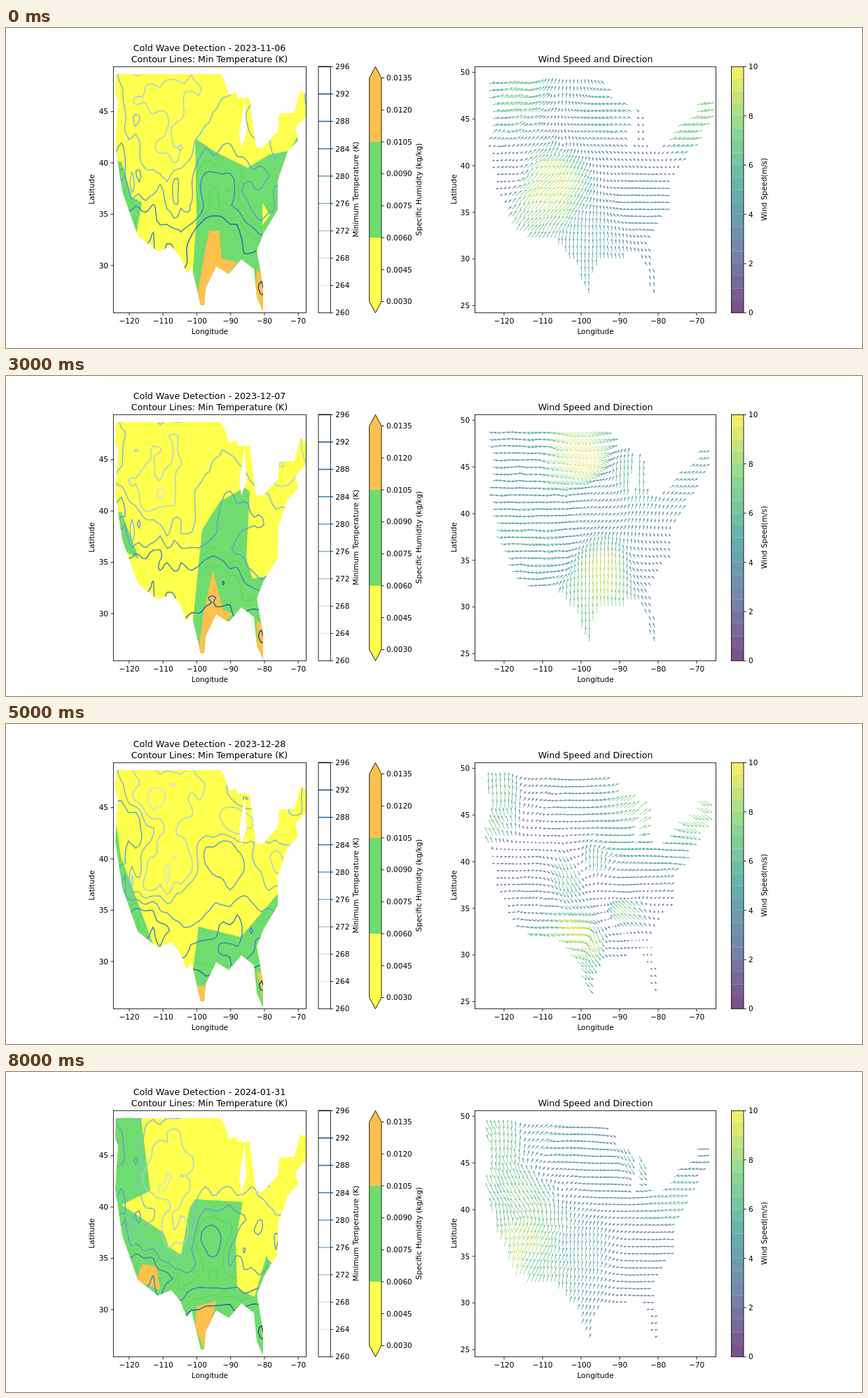
Animation of 1222x458 px, one loop 9000 ms. Source, as an HTML page with a canvas:

```html
<!DOCTYPE html>
<html lang="en">
<head>
<meta charset="utf-8">
<title>Cold wave detection</title>
<style>
  html, body { margin: 0; width: 100%; height: 100%; overflow: hidden; background: #fff; }
  canvas { display: block; }
</style>
</head>
<body>
<canvas id="stage" width="1222" height="458"></canvas>
<script>
const ctx = document.getElementById('stage').getContext('2d');
const FRAME_MS = 1000, YELLOW = '#ffff4d', GREEN = '#6fdc6f', ORANGE = '#ffc04d';
const TOP = 55.3, BOTTOM = 407.7, HEIGHT = BOTTOM - TOP;

// Land outline in the pixels of the left map: north and east coast, south and west coast, lake.
const land = new Path2D(
  'M157 66H306L313 78 318 96 328 92 331 100 348 100 354 150 357 170 366 172 388 148 390 123 412 121 420 89 428 94V127L413 143 417 161 402 177 388 218 388 260 368 293 358 318 367 370V406L358 385 354 345 336 331'
  + 'L318 352 300 341 285 372 283 397 278 397 265 342 258 351 249 328 236 312 217 320 188 297 166 234 156 168 160 105 156 93Z'
  + 'M341 102L333 150 336 172 343 150Z');

// temps: x, y, kelvin.  wind: x, y, eastward, northward (m/s).
const scenes = [];
const addScene = (date, green, orange, temps, wind) => scenes.push({ date, green, orange, temps, wind });
const coastTemps = [164, 200, 281, 195, 290, 285, 281, 385, 290, 363, 380, 291];
const southTips = 'M272 375H285V400H270ZM358 355H370V410Z';

addScene('2023-11-06',
  'M270 158L300 178 345 200 376 181 405 176 420 148 440 420H262L272 270ZM150 188L165 192 180 242 194 250 185 300H150ZM366 250L377 268 366 282Z',
  'M290 290L304 290 308 330 330 335 284 400H270L284 320ZM358 345L370 360V410L356 390Z',
  [230, 90, 272, 220, 180, 272, 390, 140, 275, 300, 240, 286, 250, 250, 279, 295, 295, 291, 360, 240, 279],
  [730, 95, 6, 2, 805, 75, 0, 4, 850, 120, -5, 1.5, 700, 210, 2, 1, 770, 235, 6, 7, 840, 320, -.5, 5, 915, 250, -4, .5, 985, 135, 7, 2]);

addScene('2023-11-17',
  'M150 110L162 112 164 195 192 250 240 268 303 268 325 296 350 255 392 212 430 420H150Z',
  'M272 375H285V400H270ZM350 338L370 350V410L355 390Z',
  [220, 90, 270, 220, 190, 268, 300, 150, 269, 390, 150, 271, 330, 230, 274, 260, 250, 275, 310, 315, 283],
  [700, 190, 1, 7, 760, 285, 4, 3, 800, 110, 4, -.5, 805, 250, 1, 6, 850, 200, 3, -1, 895, 110, 8, 0, 900, 280, -.5, 4, 980, 140, 4, -2]);

addScene('2023-11-27', 'M150 180L164 190 200 275 245 310 310 286 375 280 440 420H150Z', southTips);

addScene('2023-12-07',
  'M340 160L348 165 343 260 352 290 372 287 430 420H260L280 220 305 180ZM150 195L165 195 190 262 150 240Z',
  'M295 278L310 335 325 340 290 370 284 400H274L282 340ZM358 350L370 360V410L358 390Z',
  [240, 90, 274, 210, 170, 269, 270, 190, 276, 320, 200, 281, 400, 130, 272, 300, 300, 287, 365, 250, 278],
  [710, 130, 4, -.3, 760, 240, 5.5, -1, 818, 120, 8, -5, 850, 175, 3, 2, 855, 290, -.3, 9, 890, 150, 0, 6, 925, 280, -2.5, 2, 970, 140, 4, 2]);

addScene('2023-12-18',
  'M150 60H182L190 75 186 175 190 240 225 310 215 325 150 280ZM268 222L278 225 292 320 320 345 284 400H270L252 312ZM355 330H366L370 410H350Z',
  'M155 185L164 188 194 285 188 300 160 225ZM364 380H370V410Z',
  [170, 150, 283, 240, 110, 271, 240, 210, 269, 270, 240, 279, 330, 130, 268, 390, 190, 272, 320, 315, 281],
  [695, 150, -3, 6, 750, 240, 3, 1, 790, 100, 3.5, .5, 838, 200, .3, 6.5, 903, 115, 6, 5, 880, 240, 4, -.4, 955, 200, 6.5, -2, 860, 315, 3, -.5]);

addScene('2023-12-28', 'M150 90L164 190 212 320H150ZM275 290L335 305 395 235 440 420H258Z', southTips);

addScene('2024-01-07',
  'M150 100H160L162 205 182 250 150 200ZM278 245L284 276 310 271 332 300 366 298 380 285 370 420H265L275 310Z',
  'M286 345L300 342 285 365ZM358 372L370 370V410Z',
  [220, 110, 268, 225, 210, 268, 280, 130, 273, 340, 110, 280, 310, 190, 283, 395, 160, 278, 320, 310, 286],
  [695, 110, 0, 7, 720, 200, 2, 0, 790, 100, 3, .2, 865, 170, 6, .6, 803, 215, 2, -7, 810, 300, 9.5, -1.5, 838, 310, 2, -9, 885, 270, -6.5, 5.5, 950, 210, 2.5, 3, 985, 135, 6, -4]);

addScene('2024-01-19', 'M150 60H170L184 150 240 318H150ZM268 300L285 285 350 315 440 420H260Z', southTips);

addScene('2024-01-31',
  'M150 60H192L206 170 165 190 225 230 232 250 250 262 262 195 270 182 338 186 328 240 330 310 355 322 372 262 430 420H150Z',
  'M195 275L215 278 220 312 185 298ZM272 335L300 328 284 400 270 365ZM365 370H370V410Z',
  [170, 130, 279, 220, 150, 269, 240, 230, 270, 320, 110, 273, 290, 240, 285, 345, 250, 279, 395, 150, 275],
  [690, 110, -1.5, 7, 740, 185, -4, 6, 740, 245, 3, 8, 790, 110, 4.5, 1, 825, 265, .7, 5.5, 850, 140, 4, -.5, 905, 120, 2, -5, 900, 280, 3, -.3, 950, 170, 4.5, 2.2]);

// A day without its own samples takes those of both neighbours.
const samplesOf = (index, key) => scenes[index][key]
  || [...scenes[index - 1][key], ...scenes[index + 1][key]];

const ramp = hexes => {
  const stops = hexes.map(h => [1, 3, 5].map(k => parseInt(h.slice(k, k + 2), 16)));
  return f => {
    const p = Math.min(Math.max(f, 0), 0.9999) * (stops.length - 1), i = Math.floor(p);
    return `rgb(${stops[i].map((c, k) => Math.round(c + (stops[i + 1][k] - c) * (p - i)))})`;
  };
};
const viridis = ramp(['#440154', '#3b528b', '#21918c', '#5ec962', '#fde725']);
const blues = ramp(['#f7fbff', '#c7dcef', '#6baed6', '#2171b5', '#08306b']);
const levelColor = k => blues((k - 260) / 36);

const hash = (i, j) => { const s = Math.sin(i * 127.1 + j * 311.7) * 43758.5; return 2 * (s - Math.floor(s)) - 1; };
const mix = (a, b, f) => a + (b - a) * f;
function noise(x, y) {
  const i = Math.floor(x), j = Math.floor(y), u = x - i;
  return mix(mix(hash(i, j), hash(i + 1, j), u), mix(hash(i, j + 1), hash(i + 1, j + 1), u), y - j);
}

// Inverse-distance mean of the values that follow each x, y pair.
function interpolate(samples, size, x, y) {
  const sums = new Array(size).fill(0);
  let total = 0;
  for (let i = 0; i < samples.length; i += size + 2) {
    const w = ((samples[i] - x) ** 2 + (samples[i + 1] - y) ** 2 + 90) ** -1.6;
    total += w;
    for (let k = 0; k < size; k++) sums[k] += w * samples[i + 2 + k];
  }
  return sums.map(s => s / total);
}

function temperatureGrid(index) {
  const samples = [...coastTemps, ...samplesOf(index, 'temps')], rows = [];
  for (let y = 58; y <= 412; y += 7) {
    const row = [];
    for (let x = 150; x <= 432; x += 5) {
      const rough = x < 255 ? 3.4 : 1.5;
      const ridge = 9 * Math.exp(-(((x - 180) / 5) ** 2) - ((y - 222) / 22) ** 2);
      row.push([x, y, interpolate(samples, 1, x, y)[0] + rough * noise(x / 11, y / 21) - ridge]);
    }
    rows.push(row);
  }
  return rows;
}

function contour(grid, level, color, width) {
  ctx.beginPath();
  for (let j = 1; j < grid.length; j++) for (let i = 1; i < grid[j].length; i++) {
    const corners = [grid[j - 1][i - 1], grid[j - 1][i], grid[j][i], grid[j][i - 1]], hits = [];
    corners.forEach((a, k) => {
      const b = corners[(k + 1) % 4];
      if (a[2] < level === b[2] < level) return;
      const f = (level - a[2]) / (b[2] - a[2]);
      hits.push([mix(a[0], b[0], f), mix(a[1], b[1], f)]);
    });
    for (let h = 0; h < hits.length; h += 2) { ctx.moveTo(...hits[h]); ctx.lineTo(...hits[h + 1]); }
  }
  ctx.strokeStyle = color;
  ctx.lineWidth = width;
  ctx.stroke();
}

function drawMap(index) {
  const green = new Path2D(scenes[index].green), grid = temperatureGrid(index);
  ctx.save();
  ctx.lineCap = 'round';
  ctx.clip(land, 'evenodd');
  ctx.fillStyle = YELLOW;
  ctx.fillRect(150, TOP, 282, HEIGHT);
  ctx.fillStyle = GREEN;
  ctx.fill(green, 'evenodd');
  ctx.save();
  ctx.clip(green, 'evenodd');
  for (const level of [282, 286]) contour(grid, level, '#4fcf4f', 0.7);
  ctx.restore();
  ctx.fillStyle = ORANGE;
  ctx.fill(new Path2D(scenes[index].orange));
  for (let k = 260; k <= 296; k += 4) contour(grid, k, levelColor(k), 1.4);
  ctx.restore();
}

function arrow(x, y, u, v) {
  const speed = Math.hypot(u, v), length = speed * 2, head = Math.min(4.1, length);
  ctx.save();
  ctx.translate(x, y);
  ctx.rotate(Math.atan2(-v, u));
  ctx.fillStyle = viridis(speed / 10);
  ctx.fillRect(0, -0.4, length - head * 0.9, 0.8);
  ctx.beginPath();
  ctx.moveTo(length, 0);
  ctx.lineTo(length - head, -1.25);
  ctx.lineTo(length - head, 1.25);
  ctx.fill();
  ctx.restore();
}

function drawWind(index) {
  const samples = samplesOf(index, 'wind');
  ctx.globalAlpha = 0.75;
  for (let y = 80; y < 402; y += 10) for (let x = 684; x < 1006; x += 5.5) {
    const mapX = 175.9 + (x - 711) * 0.8775, mapY = 46.3 + (y - 63.4) * 1.1 + 2;
    if (!ctx.isPointInPath(land, mapX, mapY, 'evenodd')) continue;
    const [u, v] = interpolate(samples, 2, x, y), gust = x < 800 ? 1.3 : 0.5;
    arrow(x, y, u + gust * noise(x / 13, y / 17), v + gust * noise(x / 13 + 40, y / 17));
  }
  ctx.globalAlpha = 1;
}

function text(label, x, y, align = 'center', size = 10.5, turned = false) {
  ctx.save();
  ctx.translate(x, y);
  if (turned) ctx.rotate(-Math.PI / 2);
  ctx.font = `${size}px "DejaVu Sans", sans-serif`;
  ctx.textAlign = align;
  ctx.fillStyle = '#000';
  ctx.fillText(label, 0, size * 0.36);
  ctx.restore();
}
const title = (label, x, y) => text(label, x, y, 'center', 12.6);
const sideLabel = (label, x) => text(label, x, 231, 'center', 10.5, true);

function line(x1, y1, x2, y2, color = '#000', width = 0.85) {
  ctx.beginPath();
  ctx.moveTo(x1, y1);
  ctx.lineTo(x2, y2);
  ctx.strokeStyle = color;
  ctx.lineWidth = width;
  ctx.stroke();
}

function box(x, width) {
  ctx.strokeStyle = '#000';
  ctx.lineWidth = 0.85;
  ctx.strokeRect(x, TOP, width, HEIGHT);
}

function axes(x, width, lonX, lonStep, firstLat, lastLat, latY) {
  box(x, width);
  for (let i = 0; i < 6; i++) {
    const tickX = lonX + i * lonStep;
    line(tickX, BOTTOM, tickX, BOTTOM + 3.8);
    text('\u2212' + (120 - 10 * i), tickX, 419.5);
  }
  for (let lat = firstLat; lat <= lastLat; lat += 5) {
    line(x - 3.8, latY(lat), x, latY(lat));
    text(lat, x - 7.3, latY(lat), 'right');
  }
  text('Longitude', x + width / 2, 434.5);
  sideLabel('Latitude', x - 30.7);
}

function tick(x, y, label) {
  line(x, y, x + 3.8, y);
  text(label, x + 7, y, 'left');
}

function temperatureBar() {
  for (let k = 260; k <= 296; k += 4) {
    const y = BOTTOM - (k - 260) * HEIGHT / 36;
    line(446, y, 463.3, y, levelColor(k), 1.5);
    tick(463.3, y, k);
  }
  box(446, 17.3);
  sideLabel('Minimum Temperature (K)', 499);
}

function humidityBar() {
  const bar = new Path2D('M518.7 71.5L527.4 55.3 536 71.5V391.5L527.4 407.7 518.7 391.5Z');
  ctx.save();
  ctx.clip(bar);
  [[ORANGE, TOP], [GREEN, 162.8], [YELLOW, 300]].forEach(([color, y]) => {
    ctx.fillStyle = color;
    ctx.fillRect(518, y, 19, BOTTOM - y);
  });
  ctx.restore();
  ctx.strokeStyle = '#000';
  ctx.lineWidth = 0.85;
  ctx.stroke(bar);
  for (let i = 0; i < 8; i++) tick(536, 391.5 - i * 45.71, (0.003 + i * 0.0015).toFixed(4));
  sideLabel('Specific Humidity (kg/kg)', 589);
}

function speedBar() {
  const step = HEIGHT / 20;
  ctx.globalAlpha = 0.7;
  for (let i = 0; i < 20; i++) {
    ctx.fillStyle = viridis((i + 0.5) / 20);
    ctx.fillRect(1035.5, BOTTOM - (i + 1) * step, 17.5, step);
  }
  ctx.globalAlpha = 1;
  box(1035.5, 17.5);
  for (let s = 0; s <= 10; s += 2) tick(1053, BOTTOM - s * HEIGHT / 10, s);
  sideLabel('Wind Speed(m/s)', 1082);
}

function draw(index) {
  ctx.fillStyle = '#fff';
  ctx.fillRect(0, 0, 1222, 458);
  drawMap(index);
  drawWind(index);
  axes(153.3, 275.2, 175.9, 48.26, 30, 45, lat => 119.7 + (45 - lat) * 14.69);
  axes(669.5, 344, 711, 55, 25, 50, lat => 63.4 + (50 - lat) * 13.36);
  temperatureBar();
  humidityBar();
  speedBar();
  title('Cold Wave Detection - ' + scenes[index].date, 290.5, 28.5);
  title('Contour Lines: Min Temperature (K)', 290.5, 44);
  title('Wind Speed and Direction', 841.5, 44);
}

let start, shown;
function play(now) {
  start ??= now;
  const index = Math.floor((now - start) / FRAME_MS) % scenes.length;
  if (index !== shown) draw(shown = index);
  requestAnimationFrame(play);
}
requestAnimationFrame(play);
</script>
</body>
</html>
```
